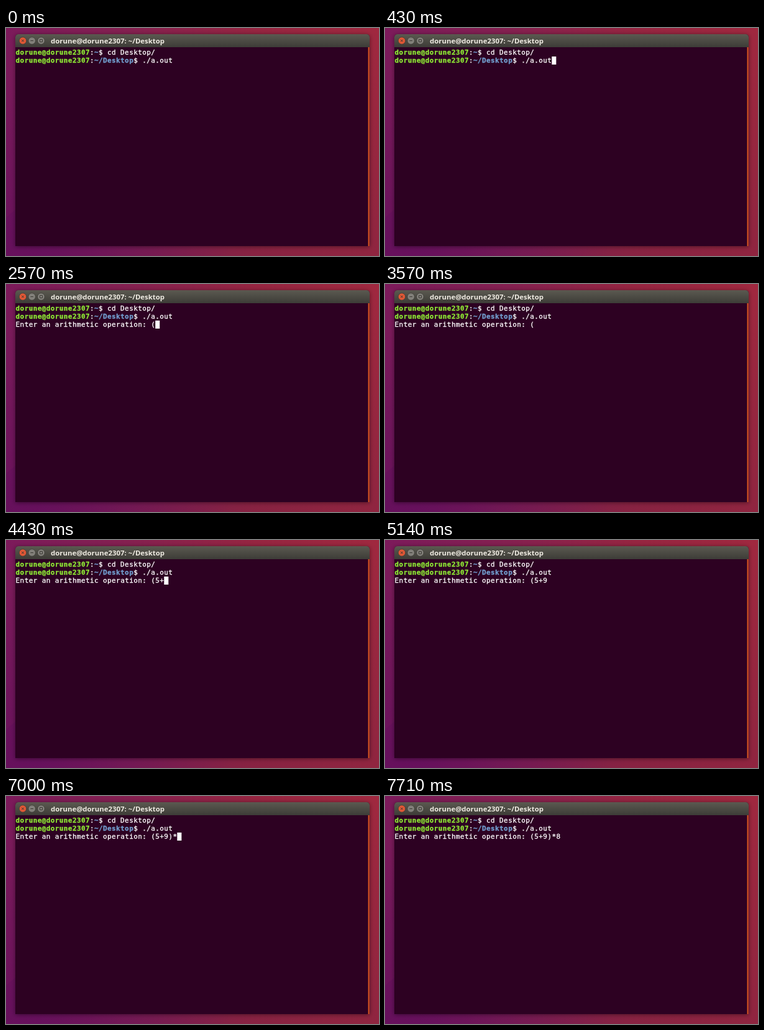
Animation of 600x368 px, one loop 8000 ms. Source, as an HTML page with a canvas:

```html
<!DOCTYPE html>
<html lang="en">
<head>
<meta charset="utf-8">
<title>Terminal calculator</title>
<style>
  html, body { margin: 0; width: 100%; height: 100%; overflow: hidden; background: #7d1b55; }
  canvas { display: block; }
</style>
</head>
<body>
<canvas id="stage" width="600" height="368"></canvas>
<script>
const ctx = document.getElementById('stage').getContext('2d');
const W = 600, H = 368, LOOP = 8000;
const WIN = { x: 15, y: 10, w: 570, h: 342, bar: 21 };
const CELL = 7.02, LEFT = 15.6, BASE = 42.5, PITCH = 13.3;
const BLINK = 570;
const MONO = '11px "DejaVu Sans Mono", monospace';
const USER = 'dorune@dorune2307';
const WHITE = '#ffffff', GREEN = '#8eea35', BLUE = '#729fcf';
const COMMAND = './a.out', QUESTION = 'Enter an arithmetic operation: ';

// Every key press restarts the cursor blink.
const keys = [
  [570, ''], [2570, '('], [3860, '5'], [4430, '+'],
  [4570, '9'], [5570, ')'], [6570, '*'], [7140, '8']
];

function shade(gradient, ...colors) {
  colors.forEach((c, i) => gradient.addColorStop(i / (colors.length - 1), c));
  return gradient;
}

function drawDesktop() {
  ctx.fillStyle = shade(ctx.createLinearGradient(0, 0, W, 0), '#7c1a5b', '#852050', '#962541', '#a0283f');
  ctx.fillRect(0, 0, W, H);
  ctx.fillStyle = shade(ctx.createLinearGradient(0, 0, 0, H), 'rgba(60,20,70,0)', 'rgba(60,20,70,.16)');
  ctx.fillRect(0, 0, W, H);
  const glow = ctx.createRadialGradient(60, H, 0, 60, H, 300);
  ctx.fillStyle = shade(glow, 'rgba(96,8,100,.5)', 'rgba(96,8,100,.25)', 'rgba(96,8,100,0)');
  ctx.fillRect(0, 0, W, H);

  ctx.fillStyle = shade(ctx.createLinearGradient(0, 0, 200, 0), 'rgba(70,0,90,.12)', 'rgba(70,0,90,0)');
  ctx.beginPath();
  ctx.moveTo(0, 306);
  ctx.lineTo(200, 133);
  ctx.lineTo(200, H);
  ctx.lineTo(0, H);
  ctx.fill();
}

function windowPath() {
  ctx.beginPath();
  ctx.roundRect(WIN.x, WIN.y, WIN.w, WIN.h, [5, 5, 0, 0]);
}

function drawButton(x, fill, mark) {
  ctx.beginPath();
  ctx.arc(x, 20.5, 5.7, 0, Math.PI * 2);
  ctx.fillStyle = fill;
  ctx.fill();
  ctx.strokeStyle = '#3a3833';
  ctx.lineWidth = 0.7;
  ctx.stroke();
  ctx.beginPath();
  mark(x, 20.5);
  ctx.lineWidth = 1;
  ctx.stroke();
}

function drawWindow() {
  ctx.save();
  ctx.shadowColor = 'rgba(0,0,0,.45)';
  ctx.shadowBlur = 7;
  ctx.shadowOffsetY = 1;
  ctx.fillStyle = '#2d0122';
  windowPath();
  ctx.fill();
  ctx.restore();

  ctx.save();
  windowPath();
  ctx.clip();
  const bar = ctx.createLinearGradient(0, WIN.y, 0, WIN.y + WIN.bar);
  ctx.fillStyle = shade(bar, '#5b5950', '#4c4b44', '#3d3c37');
  ctx.fillRect(WIN.x, WIN.y, WIN.w, WIN.bar);
  ctx.fillStyle = '#dc5722';
  ctx.fillRect(582.5, 31, 2.1, 321);
  ctx.restore();

  drawButton(27, '#e15836', (x, y) => {
    ctx.moveTo(x - 1.8, y - 1.8);
    ctx.lineTo(x + 1.8, y + 1.8);
    ctx.moveTo(x + 1.8, y - 1.8);
    ctx.lineTo(x - 1.8, y + 1.8);
  });
  drawButton(41.7, '#82807a', (x, y) => {
    ctx.moveTo(x - 2.3, y);
    ctx.lineTo(x + 2.3, y);
  });
  drawButton(56.5, '#82807a', (x, y) => ctx.rect(x - 2, y - 2, 4, 4));

  ctx.font = 'bold 11.4px "Open Sans", sans-serif';
  ctx.letterSpacing = '0px';
  ctx.fillStyle = '#efebe2';
  ctx.fillText(USER + ': ~/Desktop', 72, 24.8);
}

function drawLine(row, ...runs) {
  let x = LEFT;
  const y = BASE + row * PITCH;
  ctx.letterSpacing = '0.4px';
  ctx.lineWidth = 0.3;
  for (const [text, color, bold] of runs) {
    ctx.font = (bold ? 'bold ' : '') + MONO;
    ctx.fillStyle = ctx.strokeStyle = color;
    ctx.fillText(text, x, y);
    ctx.strokeText(text, x, y);
    x += text.length * CELL;
  }
}

function drawPrompt(row, path, command) {
  drawLine(row, [USER, GREEN, true], [':', WHITE], [path, BLUE, true], ['$ ' + command, WHITE]);
}

function drawCursor(row, column) {
  ctx.fillStyle = WHITE;
  ctx.fillRect(LEFT + column * CELL, Math.round(BASE + row * PITCH - 10), CELL, 13);
}

function draw(t) {
  drawDesktop();
  drawWindow();
  drawPrompt(0, '~', 'cd Desktop/');
  drawPrompt(1, '~/Desktop', COMMAND);

  const pressed = keys.filter(([at]) => t >= at);
  if (!pressed.length) {
    if (t >= 140) drawCursor(1, (USER + ':~/Desktop$ ' + COMMAND).length);
    return;
  }
  const line = QUESTION + pressed.map(([, key]) => key).join('');
  const since = t - pressed[pressed.length - 1][0];
  drawLine(2, [line, WHITE]);
  if (Math.floor(since / BLINK) % 2 === 0) drawCursor(2, line.length);
}

const start = performance.now();
function tick() {
  draw((performance.now() - start) % LOOP);
  requestAnimationFrame(tick);
}
tick();
</script>
</body>
</html>
```
